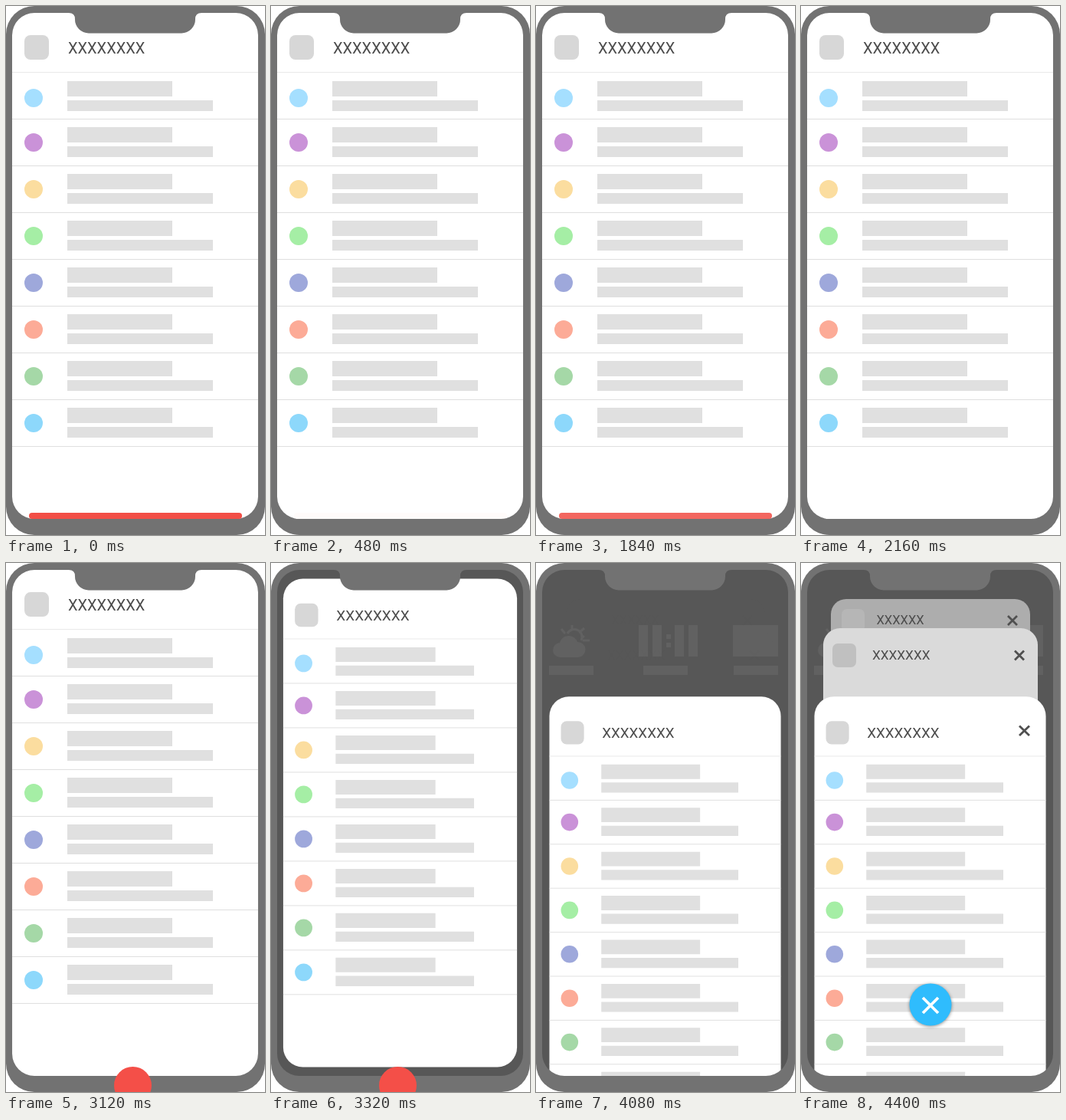
Animation of 338 by 690 pixels, one loop 5.16 s. Source, as an HTML page:

```html
<!DOCTYPE html>
<html lang="en">
<head>
<meta charset="utf-8">
<title>Swipe up to see open apps</title>
<style>
html, body { margin: 0; width: 100%; height: 100%; overflow: hidden; background: #fff; }
svg { display: block; width: 338px; height: 690px; }
text { font: 20px Roboto, sans-serif; fill: #4c4c4c; }
.close { stroke: #505050; stroke-width: 2.8; fill: none; }
#button { filter: drop-shadow(0 1px 2px rgba(0, 0, 0, .45)); }
</style>
</head>
<body>
<svg viewBox="0 0 338 690">
  <clipPath id="screen">
    <path d="M37 9H82q8 0 8 8a18 18 0 0 0 18 18.500H229a18 18 0 0 0 18-18.500q0-8 8-8H300a29 29 0 0 1 29 29V640a29 29 0 0 1-29 29H37a29 29 0 0 1-29-29V38a29 29 0 0 1 29-29z"/>
  </clipPath>
  <rect width="338" height="690" rx="37" fill="#727272"/>
  <g clip-path="url(#screen)">
    <rect width="338" height="690" fill="#575757"/>
    <g fill="#616161">
      <path d="M32 123a9 9 0 0 1-1-19a12 12 0 0 1 23-1a10 10 0 0 1 1 20z"/>
      <path d="M41 92a9 9 0 0 1 18 9M47 87V81M56 91l7-6M38 92l-5-6M61 101h9M59 94l4 3" fill="none" stroke="#616161" stroke-width="3"/>
      <path d="M134 81h12v41h-12zM152 81h12v41h-12zM181 81h12v41h-12zM199 81h12v41h-12zM170 93h6v6h-6zM170 104h6v6h-6zM257 81h59v41h-59z"/>
      <path d="M17 134h58v12h-58zM140 134h58v12h-58zM258 134h58v12h-58z"/>
    </g>
    <g class="late">
      <rect x="39" y="47" width="260" height="300" rx="20" fill="#adadad"/>
      <rect x="53" y="60" width="30" height="30" rx="7" fill="#b6b6b6"/>
      <text x="98.500" y="80" style="font-size:16.500px">XXXXXX</text>
      <path class="close" d="M270 69l12 12m0-12l-12 12"/>
      <rect x="29" y="85" width="280" height="300" rx="22" fill="#dadada"/>
      <rect x="41" y="105" width="31" height="31" rx="7" fill="#c0c0c0"/>
      <text x="93" y="126" style="font-size:17.200px">XXXXXXX</text>
      <path class="close" d="M279 114.500l12 12m0-12l-12 12"/>
    </g>
    <g id="sheet">
      <rect x="8" y="4" width="321" height="670" rx="27" fill="#fff"/>
      <rect x="24" y="38" width="32" height="32" rx="8" fill="#d7d7d7"/>
      <text x="81" y="61.500">XXXXXXXX</text>
      <path d="M8 86.500H329" stroke="#e9e9e9"/>
    </g>
    <g class="late">
      <path class="close" d="M285 212.500l13 12.500m0-12.500l-13 12.500"/>
      <g id="button">
        <circle cx="169" cy="576" r="27.500" fill="#2fbcfd"/>
        <path d="M159 567l20 20m0-20l-20 20" stroke="#fff" stroke-width="3.800"/>
      </g>
    </g>
  </g>
  <rect id="bar" x="30" y="661" width="278" height="8" rx="4" fill="#f24e46"/>
  <circle id="touch" cx="165.500" fill="#f44f48"/>
</svg>
<script>
const LOOP = 5160;
const $ = id => document.getElementById(id);
const sheet = $('sheet'), bar = $('bar'), touch = $('touch');
const late = document.querySelectorAll('.late');

const colors = ['#a5dfff', '#ca92d8', '#fbdd9f', '#a5eea5', '#9ea8db', '#fcab97', '#a5d8a7', '#8dd8fb'];
let rows = '';
colors.forEach((color, i) => {
  const y = 97 + 61 * i + (i ? 0 : 1);
  rows += `<circle cx="36" cy="${i ? y + 20 : 120}" r="12" fill="${color}"/>
    <path d="M80 ${y}h137v20h-137zM80 ${y + 25}h190v14h-190z" fill="#e0e0e0"/>
    <path d="M8 ${147.5 + 61 * i}H329" stroke="#dfdfdf"/>`;
});
sheet.insertAdjacentHTML('beforeend', rows);

const ramp = (t, from, to) => Math.min(1, Math.max(0, (t - from) / (to - from)));

// Bar opacity alternates between 1 and 0 with short rests.
const pulse = [[0, 1], [420, 0], [440, 0], [850, 1], [1270, 0], [1360, 0], [1740, 1], [2160, 0]];
function barOpacity(t) {
  const i = pulse.findIndex(p => p[0] > t);
  if (i < 0) return 0;
  const [t0, a] = pulse[i - 1], [t1, b] = pulse[i];
  return a + (b - a) * (1 - Math.cos(Math.PI * ramp(t, t0, t1))) / 2;
}

function draw(t) {
  bar.setAttribute('opacity', barOpacity(t));

  const scale = 1 - 0.059 * ramp(t, 3120, 3360);
  const drop = ramp(t, 3880, 4080);
  sheet.setAttribute('transform',
    `translate(168.5 ${339 + 150.6 * drop}) scale(${scale}) translate(-168.5 -339)`);

  const pressed = t >= 3120;
  touch.setAttribute('r', pressed ? 24.5 : 35);
  touch.setAttribute('cy', 681.5 - 672 * drop);
  touch.setAttribute('opacity', t < 2560 || t >= 4080 ? 0 : pressed ? 1 - ramp(t, 3960, 4080) : 0.5);

  const shown = ramp(t, 4080, 4400);
  late.forEach(g => g.setAttribute('opacity', shown));
}

const start = performance.now();
function tick() {
  draw((performance.now() - start) % LOOP);
  requestAnimationFrame(tick);
}
tick();
</script>
</body>
</html>
```
